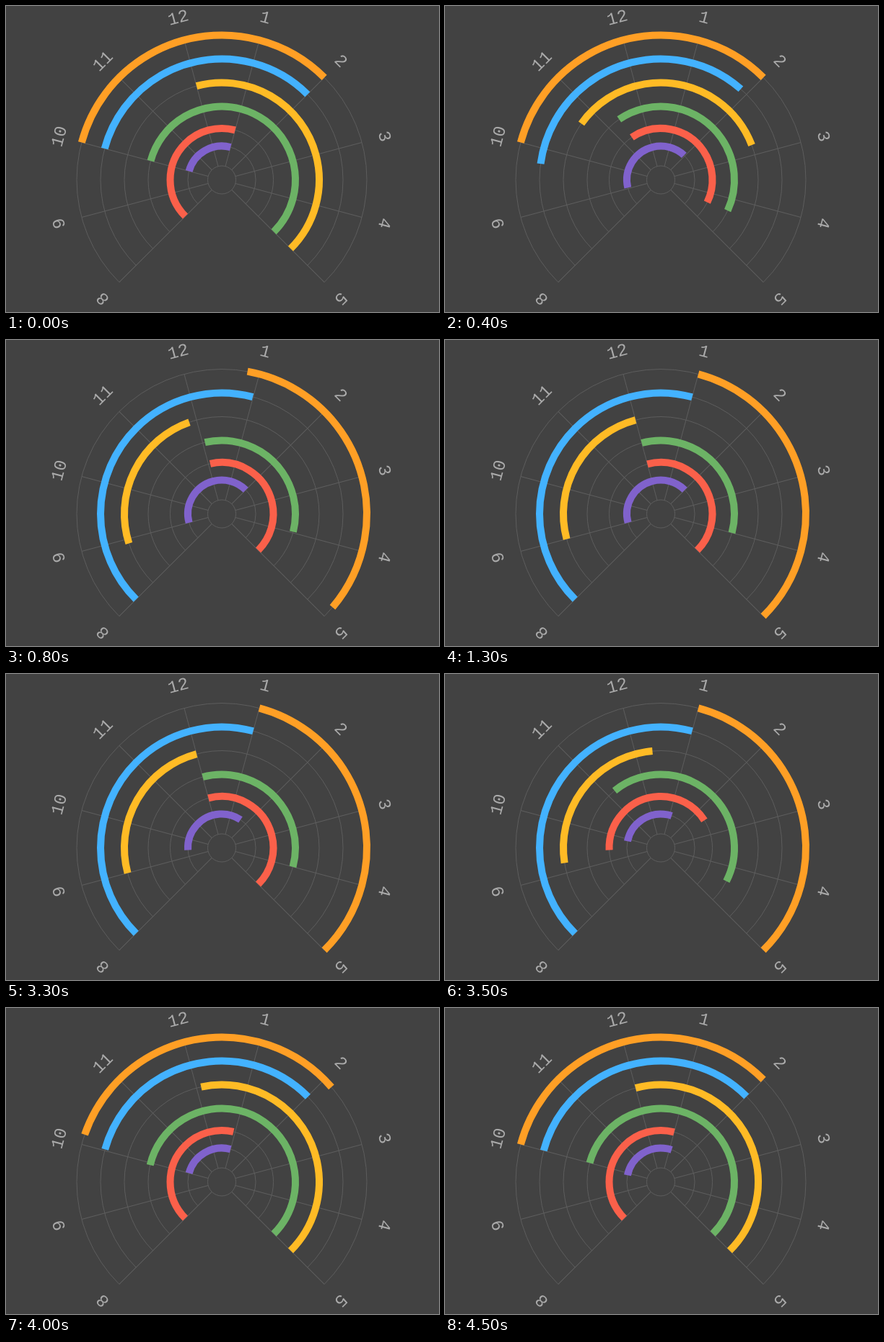
Write an HTML page with a canvas that moves like this. It is 600x425 px and loops after 5500 ms.

```html
<!DOCTYPE html>
<html lang="en">
<head>
<meta charset="utf-8">
<title>Radial time ranges</title>
<style>
html, body { margin: 0; width: 100%; height: 100%; overflow: hidden; background: #424242; }
canvas { display: block; }
</style>
</head>
<body>
<canvas id="stage" width="600" height="425"></canvas>
<script>
const ctx = document.getElementById('stage').getContext('2d');
const LOOP = 5500, STEP = 100, LAST_STEP = 4500;
const DURATION = 800, STAGGER = 80, OVERSHOOT = 0.93;
const LIMIT = 135, HUB = 19.5, RIM = 201;
const HOURS = [8, 9, 10, 11, 12, 1, 2, 3, 4, 5];

// Ranges are [start, end] in degrees clockwise from the top, innermost ring first.
const rings = [
  { r: 47, color: '#8062cc', from: [-75, 15], to: [-105, 45] },
  { r: 71.5, color: '#fb604a', from: [-135, 15], to: [-15, 135] },
  { r: 102, color: '#6cb365', from: [-75, 135], to: [-15, 105] },
  { r: 135, color: '#ffbb25', from: [-15, 135], to: [-105, -15] },
  { r: 168, color: '#43b2ff', from: [-75, 45], to: [-135, 15] },
  { r: RIM, color: '#ff9f25', from: [-75, 45], to: [15, 135] }
];

const rad = deg => deg * Math.PI / 180;

function backOut(p) {
  const v = Math.min(1, Math.max(0, p)) - 1;
  return 1 + (OVERSHOOT + 1) * v ** 3 + OVERSHOOT * v * v;
}

// Share of the way from the first range to the second for ring i.
function progress(t, i) {
  const move = start => backOut((t - start - i * STAGGER) / DURATION);
  const returnStart = i ? 3246 : 3211;
  return move(54) - move(returnStart) + move(4474);
}

function arc(r, start, end, color, width) {
  ctx.beginPath();
  ctx.arc(0, 0, r, rad(start - 90), rad(end - 90));
  ctx.strokeStyle = color;
  ctx.lineWidth = width;
  ctx.stroke();
}

function drawGrid() {
  const line = '#5d5d5d';
  arc(HUB, 0, 360, line, 1);
  for (const { r } of rings) arc(r, -LIMIT, LIMIT, line, 1);
  ctx.font = '24px "Liberation Mono", "Courier New", monospace';
  ctx.textAlign = 'center';
  ctx.fillStyle = '#aaa';
  HOURS.forEach((hour, i) => {
    ctx.save();
    ctx.rotate(rad(i * 30 - LIMIT));
    ctx.beginPath();
    ctx.moveTo(0, -HUB);
    ctx.lineTo(0, -RIM);
    ctx.stroke();
    ctx.fillText(hour, 0, -226);
    ctx.restore();
  });
}

function draw(now) {
  const t = Math.min(LAST_STEP, Math.floor(now % LOOP / STEP) * STEP);
  ctx.setTransform(1, 0, 0, 1, 0, 0);
  ctx.fillStyle = '#424242';
  ctx.fillRect(0, 0, 600, 425);
  ctx.translate(299, 241.5);
  drawGrid();
  rings.forEach(({ r, color, from, to }, i) => {
    const p = progress(t, i);
    const [start, end] = from.map((a, k) =>
      Math.max(-LIMIT, Math.min(LIMIT, a + (to[k] - a) * p)));
    arc(r, start, end, color, 10);
  });
}

const begin = performance.now();
function tick() {
  draw(performance.now() - begin);
  requestAnimationFrame(tick);
}
tick();
</script>
</body>
</html>
```
